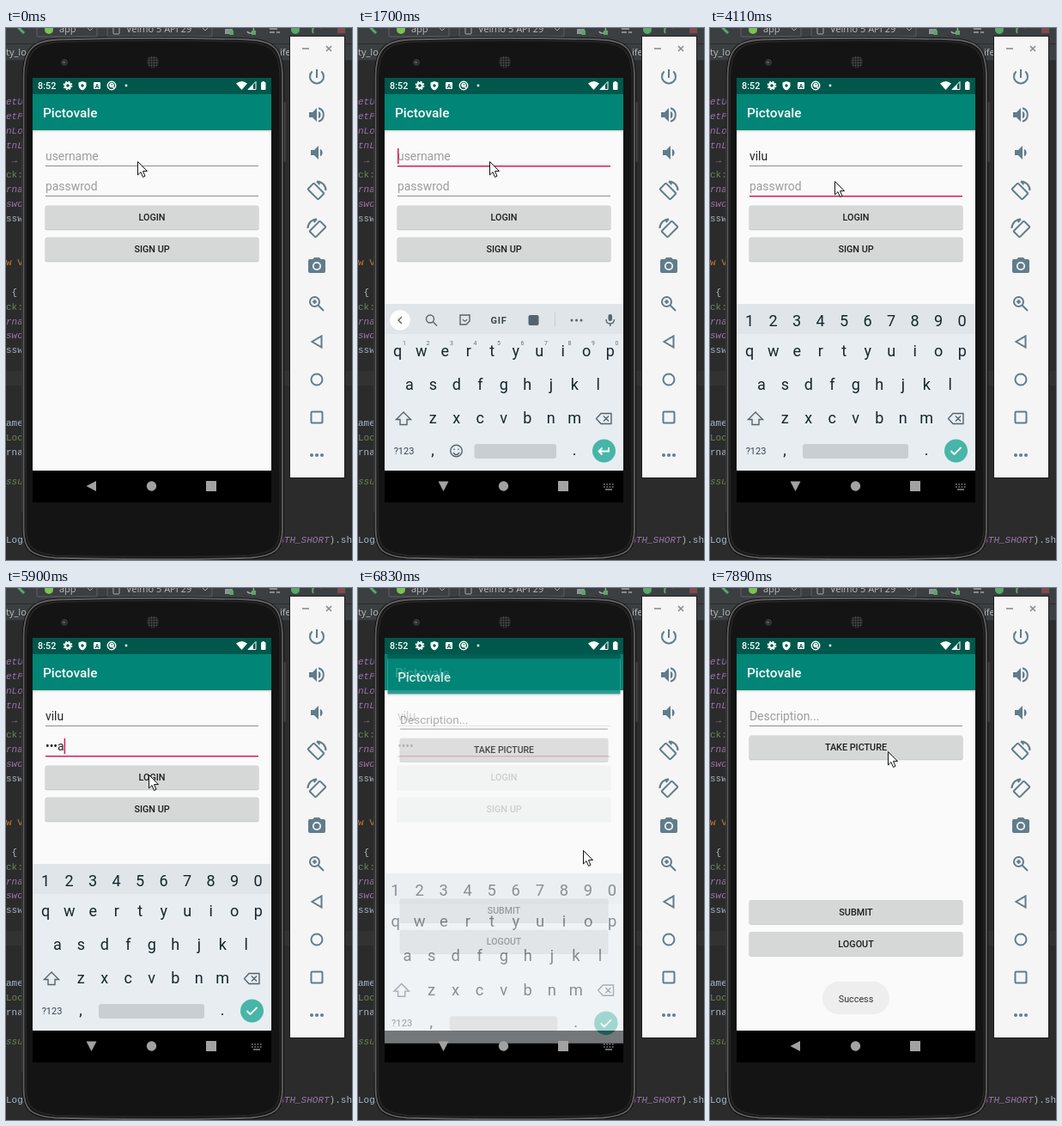
These frames come from a looping animation (403 px wide and 619 px high, 8000 ms). An HTML page:

```html
<!DOCTYPE html>
<html lang="en">
<head>
<meta charset="utf-8">
<title>Login demo</title>
<style>
html, body { margin: 0; width: 100%; height: 100%; overflow: hidden; background: #2b2b2b; }
svg { display: block; width: 403px; height: 619px; font-family: Roboto, sans-serif; }
.code { font: 11px "Liberation Mono", monospace; fill: #a9b7c6; }
.ide { font: 11px "Open Sans", sans-serif; fill: #bbb; }
.btn { font-size: 10.8px; font-weight: 500; fill: #1c1c1c; text-anchor: middle; }
.field { font-size: 13.9px; fill: #222; }
.hint { fill: #9c9c9c; }
.key { font-size: 18px; fill: #14262e; text-anchor: middle; }
.small { font-size: 11px; fill: #37474f; text-anchor: middle; }
.sup { font-size: 7px; fill: #63727a; text-anchor: middle; }
.word { font-size: 13px; fill: #263238; text-anchor: middle; }
.line { fill: none; stroke: #54646c; stroke-width: 1.4; }
.tool { fill: none; stroke: #607d8b; stroke-width: 2; }
.solid { fill: #607d8b; }
</style>
</head>
<body>
<svg id="stage" viewBox="0 0 403 619"></svg>
<script>
const rect = (x, y, w, h, fill, r = 0, more = '') =>
  `<rect x="${x}" y="${y}" width="${w}" height="${h}" rx="${r}" fill="${fill}" ${more}/>`;
const text = (x, y, s, cls, more = '') => `<text x="${x}" y="${y}" class="${cls}" ${more}>${s}</text>`;
const path = (d, more) => `<path d="${d}" ${more}/>`;
const disc = (x, y, r, more) => `<circle cx="${x}" cy="${y}" r="${r}" ${more}/>`;
const group = (id, body) => `<g id="${id}">${body}</g>`;
const at = (x, y, body) => `<g transform="translate(${x} ${y})">${body}</g>`;

// Editor behind the phone
const P = '#9876aa', G = '#6a8759', O = '#cc7832', W = '#a9b7c6';
const codeLines = [
  [89, 'etU', P, 1], [106, 'etP', P, 1], [123, 'nLo', P, 1], [140, 'tnL', P, 1], [157, ' →', '#808080'],
  [174, 'ck:', G], [191, 'rna', P, 1], [208, 'swo', P, 1], [225, 'ssw', W], [276, 'w V', O], [311, ' {', W],
  [328, 'ck:', G], [345, 'rna', P, 1], [361, 'swo', P, 1], [378, 'ssw', W], [463, 'ame', W],
  [480, 'Loc', G], [497, 'rna', W], [531, 'ssue', G, 1], [599, 'Logi', W]
];

function editor() {
  const combo = (x, w) => rect(x, -8, w, 18, '#3c3f41', 2, 'stroke="#5e6062"') +
    path(`M${x + w - 11} 0l3 3 3-3`, 'fill="none" stroke="#aaa"');
  return rect(0, 0, 403, 619, '#2b2b2b') + rect(0, 0, 403, 37, '#3c3f41') +
    rect(0, 18, 403, 1, '#2b2b2b') + rect(0, 37, 403, 1, '#323232') + rect(0, 399, 403, 17, '#323232') +
    path('M13 -2l8 8', 'stroke="#59a869" stroke-width="3"') +
    combo(36, 70) + disc(50, 2, 5, 'fill="#78c257"') + text(62, 5, 'app', 'ide') +
    combo(118, 122) + rect(125, -4, 7, 11, 'none', 1, 'stroke="#aaa"') +
    text(140, 5, 'Velmo 5 API 29', 'ide') +
    rect(255, 1, 9, 6, '#8f9395') + rect(260, 3, 5, 5, '#59a869') +
    path('M281 4a4 4 0 1 0 7-4', 'fill="none" stroke="#a0a4a6" stroke-width="1.6"') + rect(286, 3, 5, 5, '#59a869') +
    path('M307 1h9M307 5h6M315 5h4', 'stroke="#a0a4a6" stroke-width="1.5"') +
    disc(337, 2, 5, 'fill="#59a869"') + path('M358 6a5 5 0 0 1 9-6', 'fill="none" stroke="#59a869" stroke-width="2"') +
    rect(386, -3, 9, 9, '#7d4b4b') +
    text(0, 32, 'ty_lo', 'ide') + text(319, 32, 'ife', 'ide') +
    codeLines.map(([y, s, fill, italic]) =>
      text(0, y, s, 'code', `style="white-space:pre;fill:${fill};font-style:${italic ? 'italic' : 'normal'}"`)).join('') +
    text(403, 599, `<tspan fill="${P}" font-style="italic">LENGTH_SHORT</tspan>).sh`, 'code', 'text-anchor="end"');
}

function phone() {
  const body = 'M20.5 58C20.5 24 32 15 60 13.5Q171 10 283 13.5C312 15 322 24 322 58V582' +
    'C322 608 312 614 285 616.5Q171 620 57 616.5C30 614 20.5 608 20.5 582Z';
  return rect(323, 86, 2.5, 70, '#4a4a4a', 1) + rect(18, 128, 1.5, 436, '#4b4b4b', 1) +
    path(body, 'fill="#141414" stroke="#0a0a0a" stroke-width="3.5"') +
    path(body, 'fill="#141414" stroke="#606060" stroke-width="1.8"') +
    path(body, 'fill="none" stroke="#272727" stroke-width="1.5" transform="translate(171 315) scale(.982 .991) translate(-171 -315)"') +
    disc(68, 40, 3.5, 'fill="#2d3036" stroke="#3a3a3a"') + disc(67.5, 40, 1.3, 'fill="#5b6470"') +
    disc(171, 39.5, 7, 'fill="url(#mesh)"');
}

function sidePanel() {
  const solid = 'class="solid"', line = 'class="tool"';
  const speaker = x => path(`M${x}-3v6h4l5 5V-8l-5 5Z`, solid) +
    path(`M${x + 11}-4.2A4.600 4.600 0 0 1 ${x + 11} 4.200Z`.replaceAll('00 ', ' '), solid);
  const turn = rect(-8.5, -5, 17, 10, 'none', 1, `transform="translate(-1 1) rotate(45)" ${line}`) +
    path('M0-10.500A10.500 10.500 0 0 1 10.500 0M0-10.500l3.500 3.500', line);
  const icons = [
    path('M0-9V1M-5.3-6.5A8 8 0 1 0 5.3-6.5', line),
    speaker(-9) + path('M2-7.7A8 8 0 0 1 2 7.7', line),
    speaker(-7),
    turn,
    `<g transform="scale(-1 1)">${turn}</g>`,
    path('M-3-10L-4.8-8H-8Q-10-8-10-6V6Q-10 8-8 8H8Q10 8 10 6V-6Q10-8 8-8H4.8L3-10Z', solid) +
      disc(0, 0, 4.2, 'fill="#607d8b" stroke="#f5f5f5" stroke-width="1.8"'),
    disc(-2.5, -2.5, 5.5, line) + path('M1.5 1.5L8 8M-5-2.5H0M-2.5-5V0', line),
    path('M5.5-6.5V6.5L-5.5 0Z', line),
    disc(0, 0, 6.5, line),
    rect(-6.5, -6.5, 13, 13, 'none', 1, line),
    [-6, 0, 6].map(x => disc(x, 0, 2, solid)).join('')
  ];
  return rect(330.5, 9.5, 64, 514, '#f5f5f5', 0, 'stroke="#1d1d1d"') +
    path('M345 24h8M373 21l6 6m0-6l-6 6', 'stroke="#7f8a90" stroke-width="1.5"') +
    icons.map((icon, i) => at(362, 57 + 44 * i, icon)).join('');
}

// Phone screen parts
const appBar = () => rect(31, 58, 278, 19, '#00574b') + rect(31, 77, 278, 42, '#008577') +
  rect(31, 119, 278, 2, '#e4e6e6') +
  text(43, 104, 'Pictovale', '', 'font-size="15.4" font-weight="500" fill="#fff"');
const button = (y, label, id = '') =>
  rect(45.5, y + .8, 249, 28, '#c2c3c3', 2) + rect(46, y, 248, 28, '#d6d7d7', 1.5, id && `id="${id}"`) +
  text(170, y + 18, label, 'btn');
const underline = (y, id = '') => rect(46, y, 248, 1, '#8d8d8d', 0, id && `id="${id}"`);

function statusBar() {
  const line = 'fill="none" stroke="#fff" stroke-width="1.5"', white = 'fill="#fff"';
  return rect(31, 58, 278, 19, '#00574b') +
    text(37, 71, '8:52', '', 'font-size="10.8" font-weight="500" fill="#fff"') +
    disc(72, 67, 2.9, 'fill="none" stroke="#fff" stroke-width="2.2"') +
    disc(72, 67, 4.6, 'fill="none" stroke="#fff" stroke-width="1.5" stroke-dasharray="2 1.61"') +
    path('M89 62l4.5 1.6v3q0 4-4.5 6-4.5-2-4.5-6v-3Z', white) + disc(89, 67, 1.7, 'fill="#00574b"') +
    rect(102, 63, 8, 8, '#fff', 1) + text(106, 69.6, 'A', '', 'font-size="7" font-weight="700" fill="#00574b" text-anchor="middle"') +
    disc(123, 67, 4.7, line) + disc(123, 66.5, 2, line) + path('M122 66l4 4', line) + disc(140, 67, 1.4, white) +
    path('M268 64.5Q274.5 59.5 281 64.5L274.5 72Z', white) +
    path('M291 62.5V71.5H282Z', 'fill="none" stroke="#fff"') + path('M288 65.5V72H281.5Z', white) +
    rect(297, 63, 5.5, 9, '#fff', .8) + rect(298.5, 62, 2.5, 2, '#fff');
}

const login = () => rect(31, 77, 278, 438, '#fafafa') + appBar() +
  text(46, 154, 'username', 'field', 'id="user"') + underline(160, 'line1') +
  text(46, 189, 'passwrod', 'field', 'id="pass"') + underline(195, 'line2') +
  rect(0, 140, 1.5, 18, '#d81b60', 0, 'id="caret"') +
  button(206.4, 'LOGIN', 'loginKey') + button(243.4, 'SIGN UP');

const post = () => rect(31, 77, 278, 438, '#fafafa') + appBar() +
  text(46, 154, 'Description...', 'field hint') + underline(160) +
  button(171.4, 'TAKE PICTURE') + button(363, 'SUBMIT') + button(400, 'LOGOUT');

function keyboard() {
  const row = (chars, x, y, cls = 'key') => [...chars].map((c, i) => text(x + 27.5 * i, y, c, cls)).join('');
  const line = 'class="line"';
  const words = list => list.map((w, i) => text(98 + 74 * i, 345, w, 'word')).join('') +
    path('M134.5 331v18M208.5 331v18', 'stroke="#c5ccd0"');
  const round = mark => disc(286.5, 492, 13.5, 'fill="#47b5a8"') +
    path(mark, 'fill="none" stroke="#fff" stroke-width="1.8"');
  const space = x => rect(x, 484, 231 - x, 17, '#c9ced2', 3);
  const icons = disc(84, 338.5, 4.5, line) + path('M87.5 342l4.5 4.5', line) +
    path('M119 334h11v7l-4 4h-7Z', line) + path('M122 339q2.5 4 5 0', line) +
    text(164, 343.5, 'GIF', 'small', 'font-weight="700" letter-spacing=".8"') +
    rect(198.5, 334, 12, 12, '#54646c', 2) + path('M229.5 331v17', 'stroke="#c5ccd0"') +
    [249, 254.5, 260].map(x => disc(x, 340, 1.5, 'fill="#54646c"')).join('');
  const strip = disc(49, 340, 11.8, 'fill="#fff"') +
    path('M51 336l-4 4 4 4', `id="chevron" ${line}`) +
    rect(291.5, 333, 4.5, 8, '#54646c', 2.2) + path('M289 339q0 5 4.7 5t4.7-5M293.7 344v3', line);
  return rect(31, 321, 278, 194, '#e8edf1') + rect(31, 321, 278, 35, '#e0e5e9') +
    row('qwertyuiop', 46.2, 381.8) + row('asdfghjkl', 59.8, 420.8) + row('zxcvbnm', 87.2, 459.8) +
    path('M53 447l8.5 8.5h-4.5v6h-8v-6h-4.5Z', line) +
    path('M283 448.5h12v12h-12l-5.5-6ZM286 451.5l6 6m0-6l-6 6', line) +
    text(53.5, 496, '?123', 'small') + text(87, 497, ',', 'key') + text(252, 497, '.', 'key') +
    group('plain', strip + group('icons', icons) + group('words1', words(['via', 'view', 'visit'])) +
      group('words2', words(['villa', 'vilu', 'village'])) + row('1234567890', 54, 369, 'sup') +
      disc(114.5, 492, 6.8, line) + path('M111 494q3.5 5 7 0M112 489.5v1.5m5-1.5v1.5', line) + space(135.5) +
      round('M292 488v4.5h-11.5m4-4l-4 4 4 4')) +
    group('digits', row('1234567890', 46, 346.5) + space(108) + round('M280.5 492l4 4 8-8'));
}

function navIcons() {
  const keys = [0, 1, 2, 3].map(i => `M${286 + 3.3 * i} 531h1.6M${286 + 3.3 * i} 534h1.6`).join('');
  return path('M105 527V539L93.5 533Z', 'id="back" fill="#a2a2a2"') +
    disc(169.5, 533, 5.7, 'fill="#a2a2a2"') + rect(233, 527, 12, 12, '#a2a2a2') +
    path(keys + 'M288 537h8', 'id="imeIcon" stroke="#8a8a8a" stroke-width="1.6"');
}

const stage = document.getElementById('stage');
stage.innerHTML = `<defs>
  <pattern id="mesh" width="3" height="3" patternUnits="userSpaceOnUse">${rect(0, 0, 3, 3, '#1b1b1b')}${disc(1.5, 1.5, 1, 'fill="#545454"')}</pattern>
  <clipPath id="screen"><rect x="31" y="58" width="278" height="494"/></clipPath>
  <clipPath id="keyArea"><rect id="keyClip" x="31" y="58" width="278" height="457"/></clipPath></defs>` +
  editor() + phone() +
  `<g clip-path="url(#screen)">` + rect(31, 58, 278, 494, '#000') +
  group('login', login()) + group('post', post()) + statusBar() +
  `<g clip-path="url(#keyArea)">${group('keys', keyboard())}</g>` + navIcons() +
  group('toast', rect(131, 458, 78, 38, '#eee', 19) +
    text(170, 481.5, 'Success', '', 'id="toastText" font-size="10.8" fill="#333" text-anchor="middle"')) +
  '</g>' + sidePanel() +
  path('M.5 .5V16L4 12.6 6.5 18.5 9 17.4 6.5 11.6H11.5Z', 'id="mouse" fill="#fff" stroke="#111" stroke-linejoin="round"');

const el = {};
stage.querySelectorAll('[id]').forEach(node => el[node.id] = node);
const show = (node, on) => node.setAttribute('visibility', on ? 'inherit' : 'hidden');
const zoom = (s, y) => `translate(170 ${y}) scale(${s}) translate(-170 ${-y})`;

// Each step changes some of the state and then holds.
const steps = [
  [0, { mouse: [153, 155], user: '', pass: '', focus: 0, caret: 0, keys: '', drop: 0, keyAlpha: 1, keyZoom: 1,
    fill: '#d6d7d7', post: 0, postZoom: 1, toast: 0, toastInk: 1 }],
  [700, { focus: 1, caret: 1 }],
  [1000, { keys: 'icons', drop: 96 }],
  [1120, { drop: 6 }],
  [1270, { drop: 0, caret: 0 }],
  [1700, { caret: 1 }],
  [2100, { user: 'vi', keys: 'words1' }],
  [2380, { user: 'vilu', keys: 'words2' }],
  [2920, { caret: 0, mouse: [152, 158] }],
  [3040, { mouse: [148, 166] }],
  [3190, { mouse: [147, 170] }],
  [3310, { caret: 1, mouse: [145, 175] }],
  [3440, { mouse: [145, 178] }],
  [3580, { focus: 2 }],
  [3700, { keys: 'digits' }],
  [4110, { caret: 0 }],
  [4420, { pass: 'v', caret: 1 }],
  [4550, { pass: '•i' }],
  [4820, { pass: '••l' }],
  [4970, { pass: '•••a' }],
  [5400, { caret: 0, mouse: [148, 198] }],
  [5520, { mouse: [154, 228] }],
  [5660, { mouse: [160, 239] }],
  [5780, { mouse: [166, 230] }],
  [5900, { caret: 1, mouse: [166, 217] }],
  [6200, { pass: '••••', caret: 0, fill: '#c6c7c7' }],
  [6320, { fill: '#bcbdbd' }],
  [6590, { fill: '#d0d1d1', mouse: [190, 262] }],
  [6710, { fill: '#d6d7d7', mouse: [224, 300] }],
  [6830, { mouse: [262, 305], post: .8, postZoom: .975, keyAlpha: .5, keyZoom: 1.02 }],
  [6960, { mouse: [295, 307], post: 1, postZoom: .992, keyAlpha: .16, keyZoom: 1.046, toast: .5, toastInk: .9 }],
  [7100, { keys: '', postZoom: 1, toast: 1, toastInk: .85 }],
  [7250, { toastInk: 1 }],
  [7630, { mouse: [235, 240] }],
  [7770, { mouse: [217, 212] }],
  [7890, { mouse: [207, 190] }]
];
const states = [];
steps.reduce((state, [, change]) => {
  const next = { ...state, ...change };
  states.push(next);
  return next;
}, {});

function setField(node, value, hint) {
  node.textContent = value || hint;
  node.classList.toggle('hint', !value);
  return value ? node.getComputedTextLength() : 0;
}

function setLine(node, on) {
  node.setAttribute('fill', on ? '#d81b60' : '#8d8d8d');
  node.setAttribute('height', on ? 1.5 : 1);
}

function draw(s) {
  const widths = [setField(el.user, s.user, 'username'), setField(el.pass, s.pass, 'passwrod')];
  setLine(el.line1, s.focus === 1);
  setLine(el.line2, s.focus === 2);
  show(el.caret, s.caret);
  el.caret.setAttribute('x', 46 + (widths[s.focus - 1] || 0));
  el.caret.setAttribute('y', s.focus === 2 ? 175 : 140);
  el.loginKey.setAttribute('fill', s.fill);

  const fading = s.keyZoom > 1;
  const open = s.keys && s.post < 1;
  show(el.keys, s.keys);
  show(el.plain, s.keys && s.keys !== 'digits');
  for (const id of ['icons', 'words1', 'words2', 'digits']) show(el[id], s.keys === id);
  el.chevron.setAttribute('transform', s.keys === 'icons' ? '' : 'rotate(180 49 340)');
  el.keys.setAttribute('opacity', s.keyAlpha);
  el.keys.setAttribute('transform', fading ? zoom(s.keyZoom, -226) : `translate(0 ${s.drop})`);
  el.keyClip.setAttribute('height', fading ? 491 : 457);
  el.back.setAttribute('transform', open ? 'rotate(-90 99.5 533)' : '');
  show(el.imeIcon, open);

  show(el.post, s.post);
  el.post.setAttribute('opacity', s.post);
  el.post.setAttribute('transform', zoom(s.postZoom, 305));
  show(el.login, s.post < 1);
  el.toast.setAttribute('opacity', s.toast);
  el.toastText.setAttribute('opacity', s.toastInk);
  el.mouse.setAttribute('transform', `translate(${s.mouse})`);
}

const start = performance.now();
let shown = -1;
function tick() {
  const t = (performance.now() - start) % 8000;
  const i = steps.findLastIndex(([time]) => time <= t);
  if (i !== shown) draw(states[shown = i]);
  requestAnimationFrame(tick);
}
tick();
</script>
</body>
</html>
```
